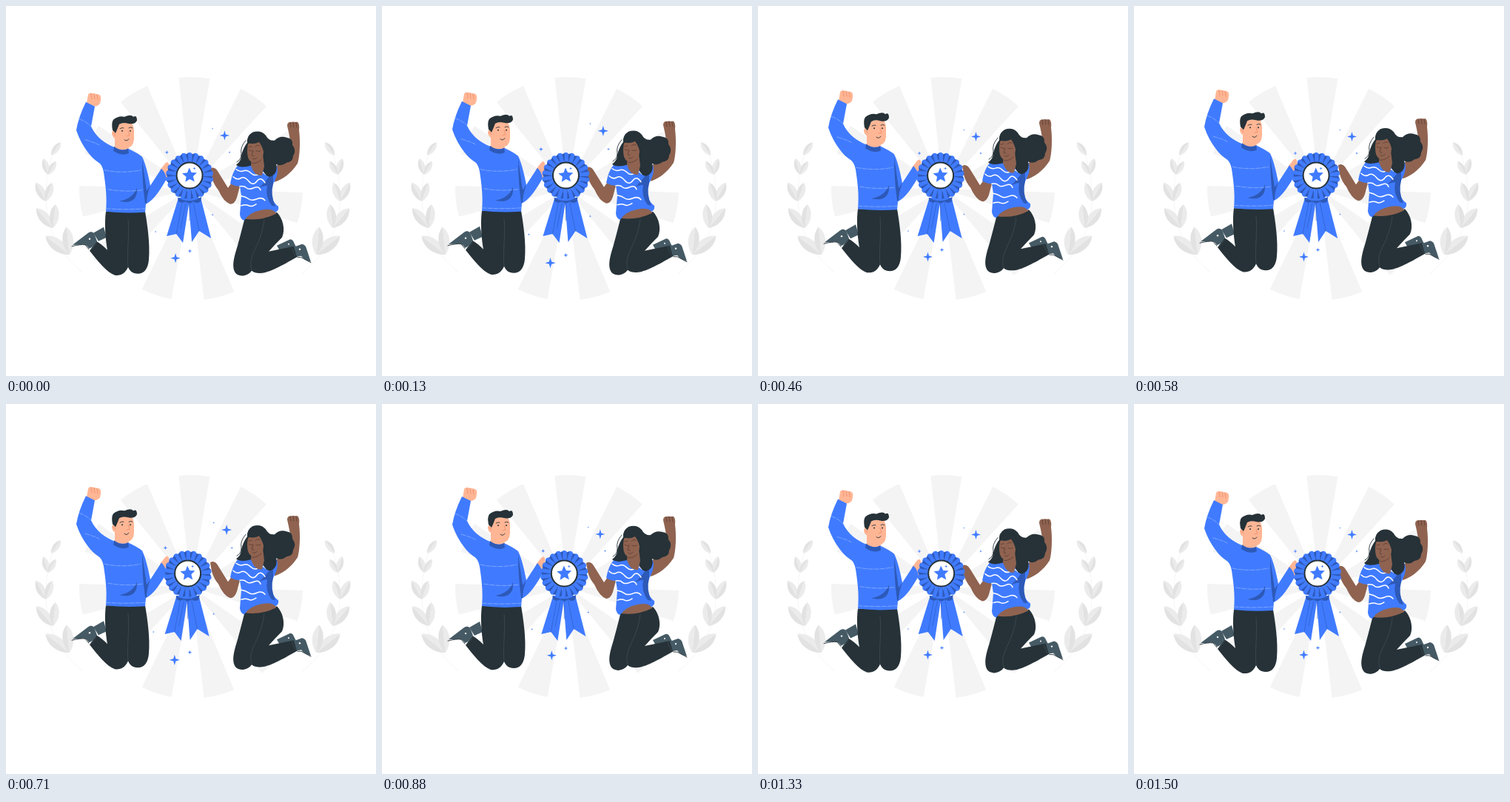
These frames come from a looping animation (500 px wide and 500 px high, 1.54 s). An HTML page:

```html
<!DOCTYPE html>
<html lang="en">
<head>
<meta charset="utf-8">
<title>Award celebration</title>
<style>
  html, body { margin: 0; width: 100%; height: 100%; overflow: hidden; background: #fff; }
  svg { display: block; width: 100%; height: 100%; }
  .blue { fill: #407bff; }
  .shade { fill: #2d59b8; }
  .dark { fill: #263238; }
  .boot { fill: #455a64; }
  .pale { fill: #ffb695; }
  .brown { fill: #8f6350; }
  .line { fill: none; stroke-width: .6; stroke-linecap: round; stroke-linejoin: round; }
  .seam { stroke: #a5c0ff; stroke-dasharray: 6 2; }
  .crease { stroke: #45545c; }
  .ink { stroke: #263238; stroke-width: .9; }
  .fold { stroke: #e67e5b; }
  .deep { stroke: #4e3027; }
  .wave { stroke: #fff; stroke-width: 1.5; }
</style>
</head>
<body>
<svg viewBox="0 0 500 500">
  <g id="rays" fill="#f4f4f4"></g>
  <g id="laurel"></g>
  <use href="#laurel" transform="matrix(-1 0 0 1 505 0)"/>
  <g id="sparkles" class="blue"></g>

  <g id="people">
    <g id="man">
      <path class="boot" d="M118 307L132 299L136 313L125 318Z"/>
      <path class="dark" d="M135 278H188C191 296 195 322 193 343C192 355 187 362 178 362C171 362 167 358 165 353C161 362 155 365 147 364C136 360 124 345 113 331L122 318Q129 322 137 330C134 313 133 292 135 278Z"/>
      <path class="line crease" d="M165 289C167 312 163 335 165 353M115 330L122 321"/>
      <path class="boot" d="M90 323L111 307Q117 303 120 310L123 318Q117 327 112 328Q108 321 100 323Z"/>
      <path class="line ink" d="M89 325Q101 322 107 323L112 329"/>
      <circle cx="113" cy="315" r="1.2" fill="#fff"/>

      <path class="pale" d="M109 132L111 120Q113 117 116 118L126 120Q129 122 128 127L127 132Q124 136 119 136Z"/>
      <path class="line fold" d="M115 119L116 126M119 119L120 126M123 120L124 127"/>
      <path class="pale" d="M208 222L215 213Q219 209 220 214L222 233L214 236Z"/>
      <path class="pale" d="M147 177V193Q158 201 166 194L165 184Z"/>
      <path class="blue" d="M108 130L120 136L115 163C121 177 134 186 146 191Q157 197 165 193Q178 199 184 204C189 214 193 232 195 243L210 220Q216 226 217 234C210 246 200 263 189 268L188 279Q160 281 135 278C137 257 134 239 132 225Q130 214 124 211C112 203 100 184 95 168Q98 150 108 130Z"/>
      <path class="shade" d="M146 190Q156 198 165 193L166 199Q157 204 145 196Z"/>
      <path class="shade" d="M153 264Q171 261 177 246Q178 257 172 262Q166 267 153 264ZM184 208Q184 238 188 267L190 267Q190 256 195 243L190 250Z"/>
      <path class="line seam" d="M99 153Q108 156 115 163M107 181Q118 184 126 188M133 222Q157 227 182 222M138 248Q161 252 184 249M135 274Q162 276 188 274"/>

      <path class="pale" d="M147 161L168 156Q174 162 173 174Q174 188 167 191Q157 192 150 180Q144 179 143 173Q143 167 148 169Z"/>
      <path class="dark" d="M148 172L144 168Q142 158 145 154Q152 148 160 150Q169 146 172 150Q177 147 177 155Q174 161 165 159Q158 157 153 160Q150 168 148 172Z"/>
      <path class="line ink" d="M154 166Q157 164 159 165M166 165Q169 163 171 165M160 181Q163 184 166 180"/>
      <path class="line fold" d="M165 169L167 175L163 176M145 172Q147 172 148 175"/>
      <g class="dark"><circle cx="157" cy="169" r="1"/><circle cx="168" cy="169" r="1"/></g>
    </g>

    <g id="woman">
      <path class="boot" d="M366 324L383 316Q387 314 390 322L395 331L371 333Z"/>
      <path class="dark" d="M323 285Q345 291 366 279C374 287 378 302 373 313Q363 323 355 332L389 325L394 339C378 348 358 360 346 361Q337 362 332 358C327 365 317 367 311 362C304 354 308 340 313 324C317 309 320 298 323 285Z"/>
      <path class="line crease" d="M349 289Q347 309 336 330Q328 346 332 357M386 327L391 338"/>
      <path class="boot" d="M389 326L400 322Q405 323 406 328L412 346Q403 344 399 338L393 339Z"/>
      <path class="line ink" d="M394 340L399 340L412 347"/>
      <g fill="#fff"><circle cx="382" cy="322" r="1"/><circle cx="397" cy="329" r="1.2"/></g>

      <path class="brown" d="M382 171L380 162Q380 157 385 157L394 157Q397 160 396 168C398 184 397 204 394 213C385 227 373 235 363 238L361 219C374 211 384 202 386 192Z"/>
      <path class="line deep" d="M384 158L385 164M388 157L389 164M392 158L393 164"/>
      <path class="brown" d="M305 239L300 246L287 225Q282 216 276 220L278 232Q281 242 287 249Q294 265 303 268Q309 268 312 259L316 244Z"/>
      <path class="brown" d="M323 277L361 271L365 281Q345 291 323 288Z"/>
      <path class="blue" d="M313 216Q322 213 331 214L348 218Q359 214 366 216Q369 225 363 237Q356 247 360 260Q362 267 368 271Q369 277 364 279Q359 273 345 276Q329 279 322 290Q317 289 316 282L318 257L316 244Q309 244 303 240Q306 224 313 216Z"/>
      <path class="shade" d="M361 223Q352 237 341 247Q347 243 353 243Q350 258 359 270L364 271Q357 255 361 241Z"/>
      <path class="line wave" d="M311 221q5 4 10 2t10 3t11 1t9 1M307 231q5 5 10 2t11 4t11 0t11 2M316 244q6-1 9 2t10 0t9 3M318 257q6 1 10 4t11 0t11 2M318 270q6-2 10 0t10-2"/>

      <path class="dark" d="M326 185Q325 176 333 171Q344 167 351 175Q355 183 363 182Q370 175 379 178Q388 179 387 188Q393 195 388 203Q388 211 379 212Q372 218 365 214Q368 227 357 231Q351 231 347 222L331 216Q317 220 311 215Q318 210 318 202Q321 191 326 185Z"/>
      <path class="line ink" d="M324 182Q316 191 318 200Q318 208 312 211"/>
      <path class="brown" d="M332 204L331 216Q336 231 346 229L349 217L347 201Z"/>
      <path class="brown" d="M327 187Q334 181 342 184Q349 186 348 198Q347 211 338 212Q330 213 327 205Q325 196 327 187Z"/>
      <path class="dark" d="M326 189Q328 177 337 176Q348 176 351 187L349 203Q348 192 342 184Q335 188 326 185Z"/>
      <path class="line deep" d="M328 191L332 190M337 190Q340 187 343 189M328 195Q330 197 333 196M338 196Q341 198 344 196M334 196L332 202L335 203M333 206Q336 209 339 205M333 213Q340 213 345 208"/>
    </g>
  </g>

  <g id="award">
    <path class="blue" d="M233 259L217 311L230 308L239 320L247 268L251 319L261 304L277 314L263 259Z"/>
    <path class="shade" d="M232 259Q248 268 264 258L263 264Q258 268 253 264Q248 269 243 264Q238 267 233 264Z"/>
    <path class="line" stroke="#2d59b8" d="M238 265L230 308M243 265L236 300M253 265L261 304M248 267V290"/>
    <g id="pleats"></g>
    <circle cx="248" cy="229" r="17.5" fill="#fff" stroke="#263238" stroke-width="2"/>
    <path id="star" class="blue"/>
  </g>
</svg>
<script>
const $ = id => document.getElementById(id);
const loop = (n, make) => Array.from({ length: n }, (_, i) => make(i)).join('');
const path = (d, attrs = '') => `<path d="${d}" ${attrs}/>`;
const polar = (x, y, r, deg) => {
  const a = deg * Math.PI / 180;
  return `${x + r * Math.cos(a)} ${y + r * Math.sin(a)} `;
};
const star = (x, y, points, outer, inner, turn) =>
  'M' + loop(points * 2, i => polar(x, y, i % 2 ? inner : outer, turn + i * 180 / points)) + 'Z';

$('rays').innerHTML = loop(11, i => {
  const mid = i * 360 / 11 - 88.3;
  return path(`M250 247L${polar(250, 247, 151, mid - 8)}A151 151 0 0 1 ${polar(250, 247, 151, mid + 8)}Z`);
});

// A leaf is two mirrored halves, one of them darker.
const leaf = (x, y, size, angle) => [1, -1].map(side => path(
  `M0 0C${size * .3} ${side * size * .26} ${size * .75} ${side * size * .26} ${size} 0Z`,
  `fill="${side > 0 ? '#ebebeb' : '#e2e2e2'}" transform="translate(${x} ${y}) rotate(${angle})"`)).join('');
$('laurel').innerHTML = path('M104 361Q54 319 54 262Q53 220 66 194', 'class="line" stroke="#f0f0f0"')
  + leaf(61, 202, 22, -54)
  + loop(4, i => {
    const x = 57 - 9.3 * i + 6.3 * i * i, y = 228 + 36 * i, size = 23 + 6 * i, tilt = 12 * i;
    return leaf(x, y, size, -106 - tilt) + leaf(x, y, size * .92, -60 - tilt);
  });

const sparkles = [[294.5, 176.5, 6.5], [229.5, 339, 6.5], [218, 199, 2.7], [301, 199, 1.7],
  [248.5, 329.5, 2.8], [278.5, 167.5, 1.3], [278.5, 281.5, 1.6], [203, 304, 1.5]];
$('sparkles').innerHTML = sparkles.map(([x, y, r]) => path(star(x, y, 4, r, r * .32, 0))).join('');

$('pleats').innerHTML = loop(22, i => {
  const step = 360 / 22, at = (r, k) => polar(248, 230, r, (i + k) * step);
  return path(`M${at(15, 0)}L${at(30, 0)}Q${at(35, .5)}${at(30, 1)}L${at(15, 1)}Z`, 'class="blue"')
    + path(`M${at(17, .1)}L${at(30, -.1)}L${at(31, .3)}Z`, 'class="shade"');
});
$('star').setAttribute('d', star(248, 229, 5, 10.5, 4.9, -93) + star(254.5, 219.5, 4, 2.2, .7, 0));

// Linear interpolation through [phase, value] pairs.
const track = (keys, u) => {
  const i = keys.findIndex(k => k[0] > u);
  const [a, va] = keys[i - 1], [b, vb] = keys[i];
  return va + (vb - va) * (u - a) / (b - a);
};
const sway = [[0, 0], [.2, .9], [.32, -1.4], [.48, -2.4], [.75, -.7], [1, 0]];
const pulse = (u, start, peak, end) =>
  Math.max(0, Math.min((u - start) / (peak - start), (end - u) / (end - peak)));

function draw(now) {
  const u = (now / 1540 + .02) % 1;
  const beat = 1 + .1 * (pulse(u, 0, .1, .3) + pulse(u, .4, .5, .6));
  $('people').setAttribute('transform', `translate(0 ${-6 * pulse(u, 0, .5, 1)})`);
  $('award').setAttribute('transform', `translate(${track(sway, u)} 0)`);
  $('sparkles').setAttribute('transform', `translate(250 255) scale(${beat}) translate(-250 -255)`);
  requestAnimationFrame(draw);
}
draw(performance.now());
</script>
</body>
</html>
```
